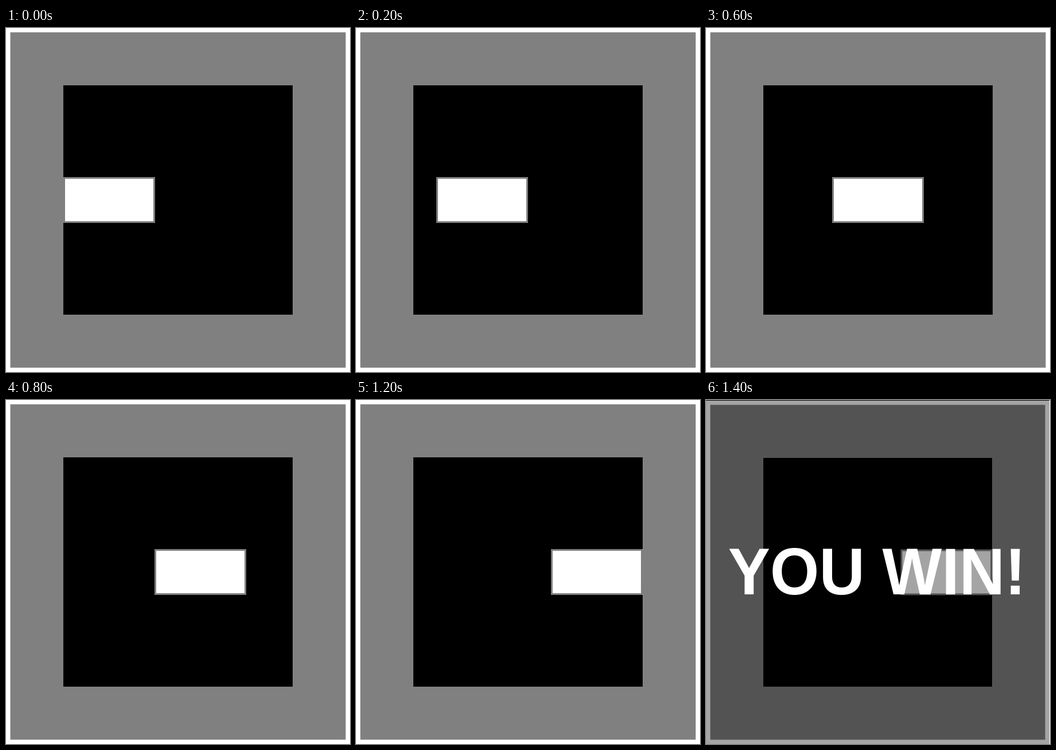
These frames come from a looping animation (600x600 px, 2000 ms). An HTML page:

```html
<!DOCTYPE html>
<html lang="en">
<head>
<meta charset="utf-8">
<title>Sliding block</title>
<style>
  html, body { margin: 0; width: 100%; height: 100%; overflow: hidden; background: #fff; }
  svg { display: block; width: 100vw; height: 100vh; }
  text { font: bold 110px "Liberation Sans", Arial, sans-serif; font-kerning: none; fill: #fff; }
</style>
</head>
<body>
<svg viewBox="0 0 600 600">
  <rect width="600" height="600" fill="#fff"/>
  <g id="board">
    <rect width="600" height="600" fill="#fff"/>
    <rect x="7.5" y="7.5" width="585" height="585" fill="#808080"/>
    <rect x="100" y="100" width="400" height="400" shape-rendering="crispEdges"/>
    <rect id="block" x="101.5" y="261.5" width="157" height="77" fill="#fff" stroke="#808080" stroke-width="3"/>
  </g>
  <g id="win" display="none">
    <rect width="600" height="600" fill="#000" opacity=".355"/>
    <rect width="599" height="1"/>
    <rect x="599" width="1" height="600" fill="#fff"/>
    <!-- slightly taller capitals -->
    <text transform="translate(38.5 339) scale(1 1.045)">YOU WIN!</text>
  </g>
</svg>
<script>
  const LOOP = 2000, STEP = 200, WIN_AT = 1400;
  const stops = [0, 40, 79, 120, 159, 200, 240];
  const [board, block, win] = ["board", "block", "win"].map(id => document.getElementById(id));

  function draw(time) {
    const t = time % LOOP;
    const won = t >= WIN_AT;
    const step = Math.min(Math.floor(t / STEP), stops.length - 1);
    block.setAttribute("transform", `translate(${stops[step]} 0)`);
    // the closing screen is one pixel smaller and sits one pixel lower
    board.setAttribute("transform", won ? `translate(0 1) scale(${599 / 600})` : "");
    win.setAttribute("display", won ? "inline" : "none");
  }

  const start = performance.now();
  function tick() {
    draw(performance.now() - start);
    requestAnimationFrame(tick);
  }
  draw(0);
  requestAnimationFrame(tick);
</script>
</body>
</html>
```
